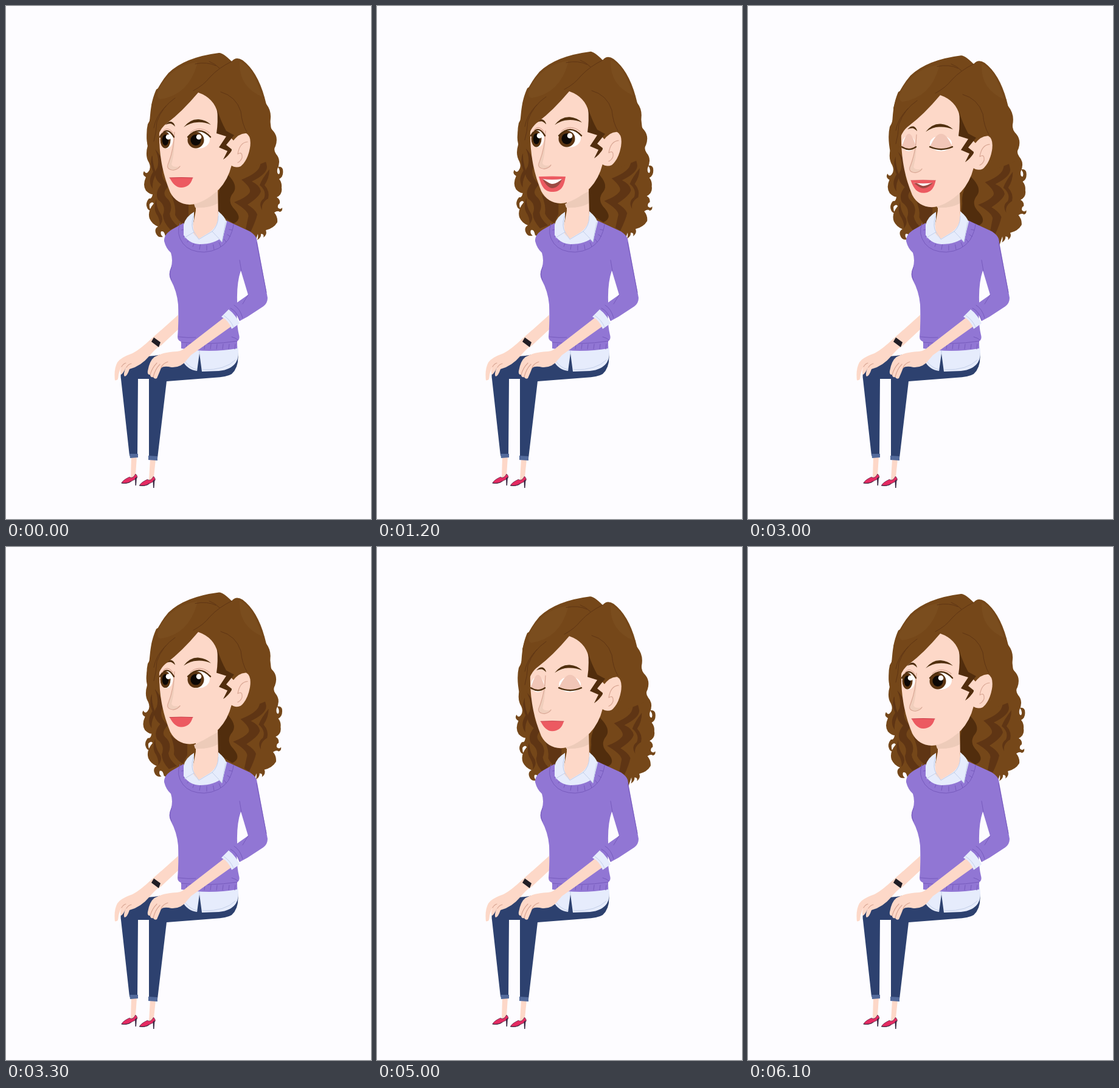
Recreate the animation shown at these times as an HTML page. Size 600 by 842 pixels, loop 6.2 s.

```html
<!DOCTYPE html>
<html lang="en">
<head>
<meta charset="utf-8">
<title>Seated woman</title>
<style>
html, body { margin: 0; width: 100%; height: 100%; overflow: hidden; background: #fdfcff; }
svg { display: block; width: 100%; height: 100%; }
.hair { fill: #754719; }
.dark { fill: #5f3514; }
.deep { fill: #512d0d; }
.skin { fill: #fdd8c8; }
.shade { fill: #edcbb9; }
.knit { fill: #9176d4; }
.shirt { fill: #e6ecfc; }
.jeans { fill: #2d416f; }
.cuff { fill: #536a9b; }
.shoe { fill: #e52a62; stroke: #4a2440; stroke-width: .7; }
.line { fill: none; stroke-linecap: round; stroke-linejoin: round; }
.strand { stroke: #5f3514; stroke-width: 1; }
.seam { stroke: #775bbd; stroke-width: 1; }
.fold { stroke: #c3cfe9; stroke-width: 1; }
.crease { stroke: #d9a795; stroke-width: 1.2; }
</style>
</head>
<body>
<svg viewBox="0 0 600 842">
  <g id="back">
    <path class="hair" d="M247 137 C236 162 238 180 235 198 Q229 215 233 229 Q228 246 235 257 Q239 266 234 272 Q230 277 227 271 Q223 277 230 281 Q224 294 230 303 Q236 309 241 309 Q240 317 235 316 Q230 322 231 328 Q233 337 240 336 Q235 334 236 325 Q240 320 243 324 Q232 337 236 349 Q240 358 250 362 Q244 365 246 372 Q249 381 258 379 Q253 375 255 370 Q260 368 262 378 L300 400 L405 400 L414 374 Q415 380 413 384 Q420 380 419 374 Q425 374 423 380 Q430 375 427 368 Q440 365 446 355 Q447 346 441 339 Q447 335 450 338 Q455 337 454 331 Q451 335 447 331 Q446 326 450 324 Q451 317 445 314 Q455 309 453 298 Q454 290 449 284 Q457 280 455 268 Q453 263 447 264 Q452 271 449 276 Q445 276 446 268 Q453 253 444 243 Q439 236 443 230 Q448 216 440 206 Q433 199 434 191 Q438 174 428 161 Q423 156 425 150 L380 100 L290 110Z"/>
    <path class="deep" d="M364 276 Q347 300 349 320 L347 340 L374 357 Q390 350 376 334 Q362 320 374 306 Q382 294 364 276Z"/>
    <path class="dark" d="M412 236 Q423 253 416 266 Q410 276 387 285 Q405 300 400 307 Q394 315 375 322 Q402 338 398 347 L394 366 L402 371 Q411 352 413 342 Q410 334 397 326 Q417 313 419 304 Q417 294 404 288 Q429 276 429 264 Q427 247 412 236Z"/>
    <path class="dark" d="M433 268 Q421 283 417 294 Q429 304 424 316 Q414 323 421 335 Q419 323 431 316 Q434 304 425 294 Q433 282 433 268Z"/>
    <path class="dark" d="M245 235 Q253 251 249 265 Q239 280 255 293 Q244 306 250 318 Q264 328 258 343 Q258 354 270 367 L283 362 Q270 351 269 341 Q276 325 263 314 Q256 306 268 295 Q251 280 259 265 Q259 250 245 235Z"/>
    <path class="dark" d="M272 311 Q280 330 278 343 Q283 353 293 358 L300 344 L300 326 Q285 324 272 311Z"/>
    <path class="dark" d="M241 242 Q235 258 242 272 Q232 287 241 300 Q240 287 247 275 Q240 259 241 242ZM247 317 Q241 333 249 344 Q254 354 252 361 Q261 351 254 341 Q247 331 247 317Z"/>
  </g>

  <path class="skin" d="M206 740H215L213 770 Q211 779 205 775ZM237 744H246L243 773 Q239 781 235 778Z"/>
  <g id="shoe">
    <path class="shoe" d="M190 783 Q192 778 203 773 Q208 777 213 768 Q218 773 214 776 Q207 779 203 782 Q196 784 190 783Z"/>
    <path d="M212 775 L215 773 L214 787 H212.5Z" fill="#3a2b45"/>
    <path class="line" stroke="#3a2b45" d="M190 783 Q200 785 205 780"/>
  </g>
  <use href="#shoe" transform="translate(29.5 4)" />
  <path class="skin" d="M283 507 Q262 526 239 546 Q220 564 208 570 Q188 577 183 585 Q177 596 179 614 Q182 615 184 612 Q185 600 190 592 L193 606 Q198 612 202 604 L204 596 Q222 590 234 577 Q244 563 255 557 L284 530Z"/>
  <path d="M243 544 L254 552 L251 560 L239 551Z" fill="#201d24"/>
  <path class="jeans" d="M189 612 Q186 596 204 589 Q219 575 244 574 L293 566 L381 567 Q384 592 371 604 Q363 609 342 610 L264 616 L249 742 H235 V612 H217 L216 738 H203Z"/>
  <path class="cuff" d="M203 735 H217 V741 L204 742ZM234 738 L249 739 V746 L234 745Z"/>
  <path class="skin" d="M225 574 Q200 574 187 584 Q178 596 179 614 Q182 615 184 612 Q184 600 190 592 Q186 600 189 605 Q193 603 197 593 Q192 605 195 608 Q199 608 203 596 Q222 591 236 574 L244 560Z"/>
  <path class="line crease" d="M190 592 Q193 587 197 586M198 593 Q201 588 206 587"/>

  <path class="shirt" d="M290 558 L381 558 Q384 575 378 585 Q370 597 350 599 L322 600 L318 570 L314 599 Q298 597 290 582 L301 570Z"/>
  <path class="line fold" d="M318 570V566M294 583Q302 594 314 597M324 597Q360 598 377 581"/>

  <path class="skin" d="M312 310 L348 300 L349 345 Q352 372 317 385 Q301 377 309 352 L312 336Z"/>
  <path class="shade" d="M309 325 L348 304 V324 Q335 332 311 331Z"/>
  <path class="knit" d="M292 356 L276 365 Q259 374 260 386 Q263 398 271 405 Q275 418 271 430 Q266 441 271 450 Q281 468 283 490 Q284 520 282 543 Q282 549 288 551 L288 562 Q335 570 380 562 L380 550 Q385 547 383 540 Q378 520 380 485 Q379 455 386 434 L398 474 L368 495 Q378 501 384 517 L397 510 L423 493 Q430 488 430 479 L412 382 Q410 376 401 370 L362 352 L345 380 L316 390 L298 378Z"/>
  <path class="line seam" d="M288 552 Q335 557 380 550M284 543 Q300 545 312 544M371 543 Q378 545 381 548M286 357 Q279 374 291 390 Q302 404 326 404 Q352 402 365 384 Q373 370 374 358M272 450 Q267 440 272 429M387 435 L384 417M412 388 L428 470M369 496 Q379 500 384 516M375 491 Q385 497 389 512M389 489 L398 474"/>
  <g id="ribs" class="line seam"></g>
  <path class="shirt" d="M309 338 Q295 346 292 359 L292 376 Q301 390 318 391 Q343 391 357 378 L363 354 L349 337 Q351 360 335 371 L317 382 Q304 373 306 361Z"/>
  <path class="shirt" d="M309 338 Q295 349 294 381 L309 371 L317 383 Q304 370 309 350ZM349 337 Q361 347 362 354 L355 388 L339 370 L318 383 Q349 367 349 347Z"/>
  <path class="line fold" d="M294 380 L309 371 L317 383 L339 370 L355 387 L361 355M308 345Q303 362 309 371M349 345Q349 361 339 370"/>
  <path class="skin" d="M359 511 L297 559 Q290 566 281 567 Q258 568 244 576 Q236 582 233 599 Q232 606 237 605 Q237 610 242 609 Q244 613 248 611 Q252 602 255 594 Q260 590 272 593 Q288 594 298 580 L304 573 L373 524Z"/>
  <path class="line crease" d="M237 605 Q240 594 248 586M242 609 Q245 596 253 588M255 594 Q257 587 266 584"/>
  <path class="shirt" d="M354 510 L366 498 Q377 506 384 521 L371 530 Q366 516 354 510Z"/>
  <path class="line fold" d="M358 508 Q369 515 374 527"/>

  <g id="head">
    <path class="skin" d="M252 202 L316 138 L350 160 L375 218 L371 261 Q365 285 350 301 Q324 325 302 326 Q280 325 270 306 Q261 284 257 264 Q251 235 252 202Z"/>
    <path class="shade" d="M277 207 Q277 235 267 259 Q263 269 276 269 Q284 268 286 263 Q275 266 272 260 Q278 238 277 207Z" opacity=".75"/>
    <path class="line crease" d="M277 207 Q276 235 267 258 Q262 268 275 269.5 Q283 268 286 263"/>
    <g id="eyes"></g>
    <g id="brows" fill="#50300f">
      <path d="M292 199 Q303 185 317 186 Q329 187 337 195 Q325 190 314 191 Q304 191 292 199Z"/>
      <path d="M262 195 Q267 189 272 190 Q277 192 278 198 Q273 193 270 193 Q266 193 262 195Z"/>
    </g>
    <path id="lips" fill="#ec5a61"/>
    <path id="inside" fill="#9c4a43"/>
    <path id="teeth" fill="#fff"/>
    <path id="lipLine" class="line" stroke="#c93f4b"/>
    <path class="hair" d="M316 142 Q289 174 265 192 Q251 202 248 222 Q246 238 241 247 L234 236 Q229 211 233 194 Q241 182 239 163 Q247 133 267 110 Q294 84 350 77 Q356 76 371 91 Q378 82 389 89 Q413 107 425 150 L434 185 L441 250 L397 268 L394 210 L375 222 L362 208 Q349 190 348 176 Q342 151 316 142Z"/>
    <path d="M314 96 Q300 146 254 153 Q243 150 256 128 Q278 97 314 92ZM384 91 Q405 97 421 149 Q382 132 384 91Z" fill="#966a3c" opacity=".16"/>
    <path class="deep" d="M347 169 Q352 187 362 205 L375 212 L362 228 L372 236 Q365 247 357 252 Q361 244 364 238 L350 232 L362 214 L346 209 Q349 190 347 169Z"/>
    <path class="line strand" d="M371 91 Q350 101 335 117 Q325 130 308 139M345 98 Q331 91 311 95M351 102 Q343 94 334 91M353 141 Q378 148 386 173 Q388 194 396 207M278 151 Q257 165 248 190 Q247 208 243 222M263 164 Q246 181 243 200"/>
    <path class="skin" d="M372 223 Q383 208 395 209 Q404 214 401 233 Q397 254 386 263 Q378 267 369 261Z"/>
    <path class="line crease" d="M397 223 Q384 224 381 243 Q389 238 388 249 Q386 255 381 257"/>
  </g>
</svg>
<script>
const $ = id => document.getElementById(id);
const set = (el, attrs) => { for (const k in attrs) el.setAttribute(k, attrs[k]); };
const make = (tag, parent, attrs) => {
  const el = document.createElementNS('http://www.w3.org/2000/svg', tag);
  set(el, attrs);
  return parent.appendChild(el);
};
const mix = (a, b, k) => a + (b - a) * k;

// Linear lookup in evenly spaced values
const sample = (list, x) => {
  if (x <= 0 || x >= list.length - 1) return 0;
  const i = Math.floor(x);
  return mix(list[i], list[i + 1], x - i);
};

// Ribbing along the hem and the neckline
let ribs = '';
for (let x = 297; x < 380; x += 10) ribs += `M${x} 555l-1 8`;
for (let i = 0; i < 11; i++) {
  const a = Math.PI * (.04 + i * .092), c = Math.cos(a), s = Math.sin(a);
  ribs += `M${330 + 37 * c} ${363 + 30 * s}L${330 + 42 * c} ${363 + 38 * s}`;
}
make('path', $('ribs'), { d: ribs });

function makeEye(cx, rx, ix, ir, x0, x1) {
  const g = $('eyes');
  const white = make('ellipse', g, { cx, rx, fill: '#fff' });
  const iris = make('g', g, {});
  make('ellipse', iris, { cx: ix, cy: 220, rx: ir, ry: 13.5, fill: '#5b3512' });
  make('ellipse', iris, { cx: ix, cy: 220, rx: ir * .64, ry: 9, fill: '#0d0805' });
  make('circle', iris, { cx: ix + 5, cy: 215, r: 4.3, fill: '#fff' });
  const lid = make('path', g, {});
  const lash = make('path', g, { class: 'line', stroke: '#50300f', 'stroke-width': 2.4 });
  const fold = make('path', g, { class: 'line crease' });
  const mid = (x0 + x1) / 2;
  return shut => {
    const y = mix(215, 227, shut), dip = mix(195, 235, shut);
    set(white, { cy: 219 + 2.5 * shut, ry: 15 - 2.5 * shut });
    set(iris, { visibility: shut > .8 ? 'hidden' : 'visible' });
    set(lid, {
      d: `M${x0} ${y}Q${mid} ${mix(190, 184, shut)} ${x1} ${y}Q${mid} ${dip} ${x0} ${y}Z`,
      fill: shut ? '#f1c6b7' : '#f7cebe'
    });
    set(lash, { d: `M${x0} ${y}Q${mid} ${dip} ${x1} ${y}` });
    set(fold, {
      d: `M${x0 + 4} 208Q${mid} 195 ${x1 - 2} 208`,
      opacity: 1 - shut
    });
  };
}
const eyes = [makeEye(317, 18, 312, 13.5, 299, 336), makeEye(264, 10.5, 262, 8.5, 253, 276)];

function drawMouth(open) {
  const l = 269 - 3 * open, r = 307 + 3 * open, low = mix(298, 307, open);
  const bowl = (a, b, top, arch, base) =>
    `M${a} ${top}Q288 ${arch} ${b} ${top}C${b - 3} ${base - 5} ${b - 10} ${base} 288 ${base}` +
    `C${a + 11} ${base} ${a + 5} ${base - 6} ${a} ${top}Z`;
  const show = open > .1 ? 'visible' : 'hidden';
  set($('lips'), { d: bowl(l, r, 282, 281, low) });
  set($('inside'), { d: bowl(272, 304, 286, 288, mix(289, 301, open)), visibility: show });
  set($('teeth'), { d: bowl(272, 304, 286, 288, mix(288, 294, open)), visibility: show });
  set($('lipLine'), { d: `M${l} 282Q288 281 ${r} 282`, opacity: 1 - open });
}

const LOOP = 6200, STEP = 100;
const nods = [8.7, 30, 50];
const dipTable = [0, 2, 4.2, 2.6, -1.2, -2.4, -1.4, -.4, 0];
const blinkTable = [0, .5, 1, .85, .3, 0];

function draw(ms) {
  const n = Math.floor(ms % LOOP / STEP);
  let dy = 0, shut = 0;
  for (const peak of nods) {
    dy += sample(dipTable, n - peak + 2);
    shut += sample(blinkTable, n - peak + 2);
  }
  const open = Math.max(0, Math.min(1, (n - 8) / 3, (32 - n) / 4));
  const skew = dy * .0042;
  set($('back'), { transform: `matrix(1 0 ${skew} 1 ${-140 * skew} ${dy})` });
  set($('head'), { transform: `translate(0 ${dy})` });
  set($('brows'), { transform: `translate(0 ${dy * .8})` });
  eyes.forEach(eye => eye(shut));
  drawMouth(open);
}

const start = performance.now();
(function tick() {
  draw(performance.now() - start);
  requestAnimationFrame(tick);
})();
</script>
</body>
</html>
```
